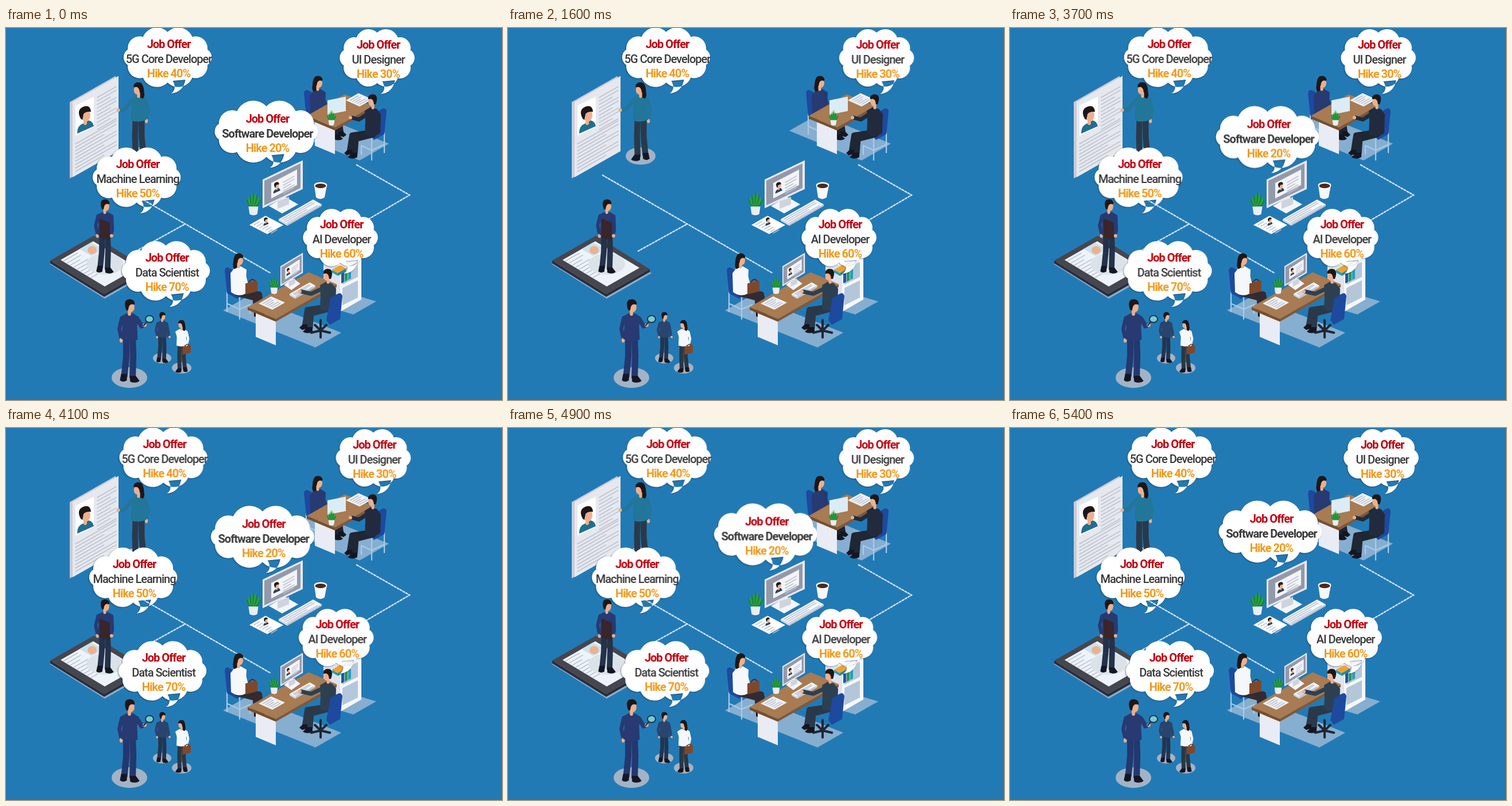
Animation of 864 by 648 pixels, one loop 7500 ms. Source, as an HTML page:

```html
<!DOCTYPE html>
<html lang="en">
<head>
<meta charset="utf-8">
<title>Job offers</title>
<style>
html, body { margin: 0; width: 100%; height: 100%; overflow: hidden; background: #227ab5; }
svg { display: block; width: 100vw; height: 100vh; }
.cloud { fill: #fff; filter: drop-shadow(-1px 1px 1px rgba(20, 40, 70, .5)); }
text { font: 500 20px Roboto, "Open Sans", sans-serif; letter-spacing: -.05em; text-anchor: middle; fill: #39393b; }
.bold { font-weight: 700; }
.offer { fill: #c3000f; }
.hike { fill: #f19a1c; }
</style>
</head>
<body>
<svg id="stage" viewBox="0 0 864 648"></svg>
<script>
const stage = document.getElementById('stage');
const SKIN = '#eeb08c', HAIR = '#1d1719', SHOE = '#141722', WHITE = '#f6f7fb', STEEL = '#a9cbe6';
const FLOOR = '#86aed0', SPOT = '#a3b3c6', NAVY = '#273a72', DARK = '#2a394a', SEAT = '#1d499f';
const SLOPE = .57;

const poly = (fill, points) => `<polygon fill="${fill}" points="${points}"/>`;
const shape = (fill, d) => `<path fill="${fill}" d="${d}"/>`;
const line = (color, width, d) =>
  `<path fill="none" stroke="${color}" stroke-width="${width}" stroke-linecap="round" stroke-linejoin="round" d="${d}"/>`;
const oval = (fill, x, y, rx, ry = rx * .58) => `<ellipse fill="${fill}" cx="${x}" cy="${y}" rx="${rx}" ry="${ry}"/>`;
const group = (x, y, sx, sy, body) => `<g transform="translate(${x} ${y}) scale(${sx} ${sy})">${body}</g>`;

// Isometric pieces start at their left corner; a runs right and down, b right and up.
const tile = (fill, x, y, a, b, down = SLOPE) => poly(fill,
  [[x, y], [x + a, y + a * down], [x + a + b, y + a * down - b * SLOPE], [x + b, y - b * SLOPE]]);
const panel = (fill, x, y, w, h, up = SLOPE) => poly(fill,
  [[x, y], [x + w, y - w * up], [x + w, y - w * up + h], [x, y + h]]);
const block = (x, y, a, b, h, [top, left, right], down = SLOPE) =>
  panel(left, x, y, a, h, -down) + panel(right, x + a, y + a * down, b, h) + tile(top, x, y, a, b, down);

// Lines of small print; every third one is shorter.
function print(x, y, w, n, gap, shift = 0, color = '#bac1cd') {
  let d = '';
  for (let i = 0; i < n; i++) {
    const len = i % 3 === 2 ? w * .7 : w;
    d += `M${x + i * shift} ${y + i * gap}l${len} ${-len * SLOPE}`;
  }
  return line(color, 1.5, d);
}

const portrait = (x, y, size, shirt) => group(x, y, size, size,
  shape(shirt, 'M-15 32Q-15 18-6 15L5 9Q12 10 14 19z') + line(SKIN, 6, 'M-1 6V14') + oval(SKIN, 0, 0, 8, 11) +
  shape(HAIR, 'M-9 6Q-17-10-4-15Q8-19 9-6Q0-7-4-2L-6 8z'));

const head = long =>
  (long ? shape(HAIR, 'M-3-8Q-9-5-9 6Q-11 14-7 18L0 14L4-3z') : '') +
  line(SKIN, 5, 'M0 6V14') + oval(SKIN, 2, 3, 6, 8) +
  shape(HAIR, 'M-5 8Q-10-6-3-9Q5-11 8-5Q9-1 7-1Q1-3-1 3L-2 8z');

const arm = (color, x, y, [hx, hy]) =>
  line(color, 7, `M${x} ${y}L${(x + hx) / 2 + 2} ${(y + hy) / 2 + 7}L${hx} ${hy}`) + oval(SKIN, hx + 2, hy, 3, 3);

// Standing figure, 130 units tall, feet at the origin, facing right.
function standing(x, y, height, dir, { top, legs, hand, long, spot }) {
  const size = height / 130;
  return (spot ? oval(SPOT, x, y - 8, spot) : '') + group(x, y, dir * size, size,
    line(legs, 10, 'M-5-72L-5-40L-8-10M5-72L6-40L5-8') +
    shape(SHOE, 'M-13-13h9v10q-6 4-11 0zM1-10h9l6 8q-6 5-15 1z') +
    line(top, 6, 'M-12-101L-16-84L-13-70') + oval(SKIN, -13, -66, 2.5, 3.5) +
    shape(top, 'M-14-103L-5-108H6L14-103L12-88L13-67Q0-62-13-68L-11-88z') +
    group(0, -121, 1, 1, head(long)) + arm(top, 12, -100, hand));
}

// Seated figure with the head at the origin, facing right.
const seated = (x, y, dir, { top, legs, hand, long }) => group(x, y, dir, 1,
  line(legs, 10, 'M2 57L36 62L40 88') + line(legs, 11, 'M-1 60L30 68L32 93') +
  shape(SHOE, 'M27 92h9l8 8q-8 5-17 0zM36 87h8l6 6-5 4-9-3z') +
  shape(top, 'M-14 25L-7 16L4 13L14 19L13 38L14 60Q0 68-13 58z') +
  head(long) + arm(top, 8, 24, hand));

const seat = (x, y, dir) => group(x, y, dir, 1,
  shape(SEAT, 'M-24 20Q-22 12-14 17L-3 24L4 62L-2 70L-20 60z'));
const chair = (x, y, dir) =>
  group(x, y, dir, 1, line(STEEL, 2.2, 'M-20 58V92M2 68V105M-20 78L2 88L20 80V95')) + seat(x, y, dir);

function swivelChair(x, y) {
  let d = `M${x} ${y - 18}V${y}`;
  for (let i = 0; i < 5; i++) {
    const turn = (i + .25) * Math.PI * .4;
    d += `M${x} ${y}l${17 * Math.cos(turn)} ${12 * Math.sin(turn)}`;
  }
  return line('#1f2635', 4, d) + seat(x + 14, y - 80, -1);
}

const desk = (x, y, a, b) => panel('#e9ecf4', x + 14, y + 10, a - 14, 42, -.42) +
  block(x, y, a, b, 5, ['#a87b52', '#75502f', '#80583a'], .42);

function plant(x, y, size) {
  let leaves = '';
  for (let i = -4; i <= 4; i++) {
    const tip = Math.abs(i) * 4 - 32;
    leaves += shape(i % 2 ? '#2fa53b' : '#16863a', `M${i - 2} 0Q${i * 3 - 2} ${tip / 2} ${i * 3.2} ${tip}Q${i * 3 + 3} ${tip / 2} ${i + 2} 0z`);
  }
  return group(x, y, size, size, leaves + shape('#e9edf5', 'M-9-1L-7 13Q0 17 7 13L9-1z'));
}

const paper = (x, y) => tile('#eff1f6', x, y, 24, 22, .45) + print(x + 8, y, 14, 5, 1.8, 4);
const keyboard = (x, y, a, b) =>
  block(x, y, a, b, 3, [WHITE, '#d5dae4', '#bec6d4']) + print(x + 6, y, b - 7, 4, a / 7, a / 5);

const monitor = (x, y, sx, sy) => group(x, y, sx, sy,
  tile('#f4f5f9', 11, 46, 23, 28) + panel('#cfd3dd', 26, 38, 20, 13, .4) +
  panel('#e8eaf0', 0, 0, 70, 50, .48) + panel('#9499aa', 3, 2, 63, 43, .48) +
  panel('#f2f4f8', 15, 6, 45, 27, .52) + portrait(25, 11, .42, '#2c4261') + print(36, 5, 19, 5, 5));

const cup = (x, y) => shape(WHITE, `M${x - 11} ${y}l3 21q7 6 15 0l4-21z`) +
  oval('#fff', x, y, 11.5, 5.5) + oval('#50281d', x, y + 1, 9.5, 4);

const bag = (x, y, size) => group(x, y, size, size,
  line('#54291b', 2, 'M-5-8q6-9 11-2') + panel('#7e482d', -11, -6, 21, 19, .25));

function resume() {
  return panel('#c8cbd6', 111, 129, 80, 133) + panel('#e6e8ee', 116, 129, 80, 131) +
    panel('#fff', 121, 135, 32, 53, .48) + portrait(139, 152, 1, '#1f6f90') +
    print(159, 121, 33, 10, 6.2) + print(121, 202, 71, 9, 6);
}

function tablet() {
  return tile(FLOOR, 76, 411, 96, 78, .63) +
    block(77, 405, 94, 76, 5, ['#46464f', '#2c2c36', '#2c2c36'], .62) +
    tile('#edf3f8', 95, 404, 77, 57, .6) + tile('#c9e1ee', 128, 385, 21, 20) +
    oval(SKIN, 150, 387, 8, 7) + print(100, 406, 24, 9, 3.6, 6) + oval('#dbe3e9', 172, 411, 32);
}

function bookshelf() {
  let books = '';
  ['#1f55a0', '#2a9655', '#26a0b6'].forEach((color, i) => { books += panel(color, 584 + i * 6, 428 - i * 3, 5, 17); });
  return tile(FLOOR, 575, 490, 30, 40, .3) +
    block(553, 404, 29, 37, 78, ['#fff', '#dde2ec', WHITE], .42) +
    panel('#b4c6da', 586, 421, 27, 26, .5) + panel('#b4c6da', 586, 453, 27, 30, .5) + books +
    block(568, 421, 10, 14, 5, ['#f3a12a', '#26a0b6', '#1f8aa0']);
}

const suit = { top: '#222b3d', legs: '#1f2634', hand: [37, 31] };
const sweater = { top: NAVY, legs: '#1d2335', hand: [15, 48], long: true };

stage.innerHTML = `<path d="M164 256L461 427M311 342L226 389M610 238L703 291L628 335"
    fill="none" stroke="#dce9f4" stroke-width="2.2" stroke-dasharray="5 .8"/>` +
  resume() +
  standing(231, 231, 136, -1, { top: '#22769a', legs: DARK, hand: [32, -84], long: true, spot: 26 }) +
  tablet() +
  standing(172, 427, 128, 1, { top: NAVY, legs: '#24324a', hand: [10, -66] }) +
  panel('#38262a', 163, 332, 18, 32, -.4) +
  standing(215, 617, 144, 1, { top: NAVY, legs: '#24376f', hand: [22, -90], spot: 31 }) +
  line('#26324a', 2.5, 'M240 518l5-6') + oval('#26324a', 250, 507, 8, 7) + oval('#74cdd5', 250, 507, 6, 5) +
  standing(272, 583, 88, 1, { top: '#29446d', legs: '#24344f', hand: [17, -66], spot: 16 }) +
  standing(306, 600, 91, -1, { top: WHITE, legs: '#2b3642', hand: [-10, -66], long: true, spot: 17 }) +
  bag(315, 560, .7) +
  // Interview at the top right
  tile(FLOOR, 490, 179, 126, 51, .41) +
  chair(543, 93, 1) + seated(543, 93, 1, sweater) +
  desk(524, 153, 49, 66) + paper(592, 126) +
  panel('#b9d6e8', 560, 143, 32, 8, .2) + panel('#dcecf5', 560, 126, 32, 25, .2) + plant(567, 161, .6) +
  chair(639, 125, -1) + seated(639, 125, -1, suit) +
  // Workstation in the middle
  monitor(447, 264, 1, 1) + keyboard(475, 333, 15, 60) + cup(548, 274) + plant(431, 312, .95) +
  tile('#fff', 424, 343, 31, 28, .52) + portrait(453, 335, .32, '#293e59') + print(432, 343, 10, 7, 2.4, 5) +
  // Interview at the bottom
  tile(FLOOR, 378, 492, 161, 45, .4) + bookshelf() +
  chair(405, 402, 1) + seated(405, 402, 1, { top: WHITE, legs: '#312b34', hand: [14, 48], long: true }) + bag(428, 451, 1) +
  desk(421, 486, 49, 106) + paper(440, 480) + plant(467, 453, .7) +
  monitor(478, 415, .56, .7) + keyboard(494, 463, 10, 35) +
  seated(561, 429, -1, { top: '#2c4052', legs: DARK, hand: [47, 30] }) + swivelChair(548, 527);

// Scalloped ellipse: ten arcs between evenly turned notches, plus the tail.
function cloud(half) {
  let d = '', last;
  for (let i = 0; i <= 10; i++) {
    const turn = (i + .5) * Math.PI / 5;
    const x = (half - 4) * Math.cos(turn) - 2, y = 44 * Math.sin(turn) - 3;
    const r = last && .6 * Math.hypot(x - last[0], y - last[1]);
    d += last ? `A${r} ${r} 0 0 1 ${x} ${y}` : `M${x} ${y}`;
    last = [x, y];
  }
  return `<path class="cloud" d="${d}zM7 38Q15 53 4 60Q25 58 29 36z"/>`;
}

const label = (text, cls, y) => `<text class="${cls}" y="${y + 7}">${text}</text>`;

const LOOP = 7500, SWAY = 8.5;
const at = (ms, frame, easing = 'step-end') => ({ ...frame, offset: ms / LOOP, easing });
const move = (x, y) => ({ transform: `translate(${x}px, ${y}px)` });

const offers = [
  { role: 'UI Designer', hike: 30, half: 65, x: 644, y: 55, drift: 4 },
  { role: 'AI Developer', hike: 60, half: 65, x: 578.5, y: 368, drift: 2.5 },
  { role: '5G Core Developer', hike: 40, half: 77, x: 277.5, y: 54, drift: 2.5 },
  { role: 'Machine Learning', hike: 50, half: 77, x: 226.5, y: 263, drift: 5.5 },
  { role: 'Data Scientist', hike: 70, half: 77, x: 277.5, y: 426, drift: 5.5 },
  { role: 'Software Developer', hike: 20, half: 91, x: 451, y: 193, drift: 4, lift: 9.5, cls: 'bold' },
];

// Bubbles appear one by one, drift left together, then sway right.
offers.forEach(({ role, hike, half, x, y, drift, lift = 0, cls = '' }, i) => {
  const bubble = document.createElementNS('http://www.w3.org/2000/svg', 'g');
  bubble.innerHTML = cloud(half) + label('Job Offer', 'bold offer', -26) +
    label(role, cls, 0) + label(`Hike ${hike}%`, 'bold hike', 25);
  stage.append(bubble);

  const rest = move(x, y), left = move(x - drift, y - lift / 10), right = move(x - drift + SWAY, y - lift);
  const timing = { duration: LOOP, iterations: Infinity };
  bubble.animate([
    at(0, { opacity: 1 }), at(100, { opacity: 0 }), at(600 + 500 * i, { opacity: 1 }), at(LOOP, { opacity: 1 }),
  ], timing);
  bubble.animate([
    at(0, right), at(100, rest), at(3600, rest, 'steps(9)'),
    at(4500, left, 'steps(9)'), at(5400, right), at(LOOP, right),
  ], timing);
});
</script>
</body>
</html>
```
